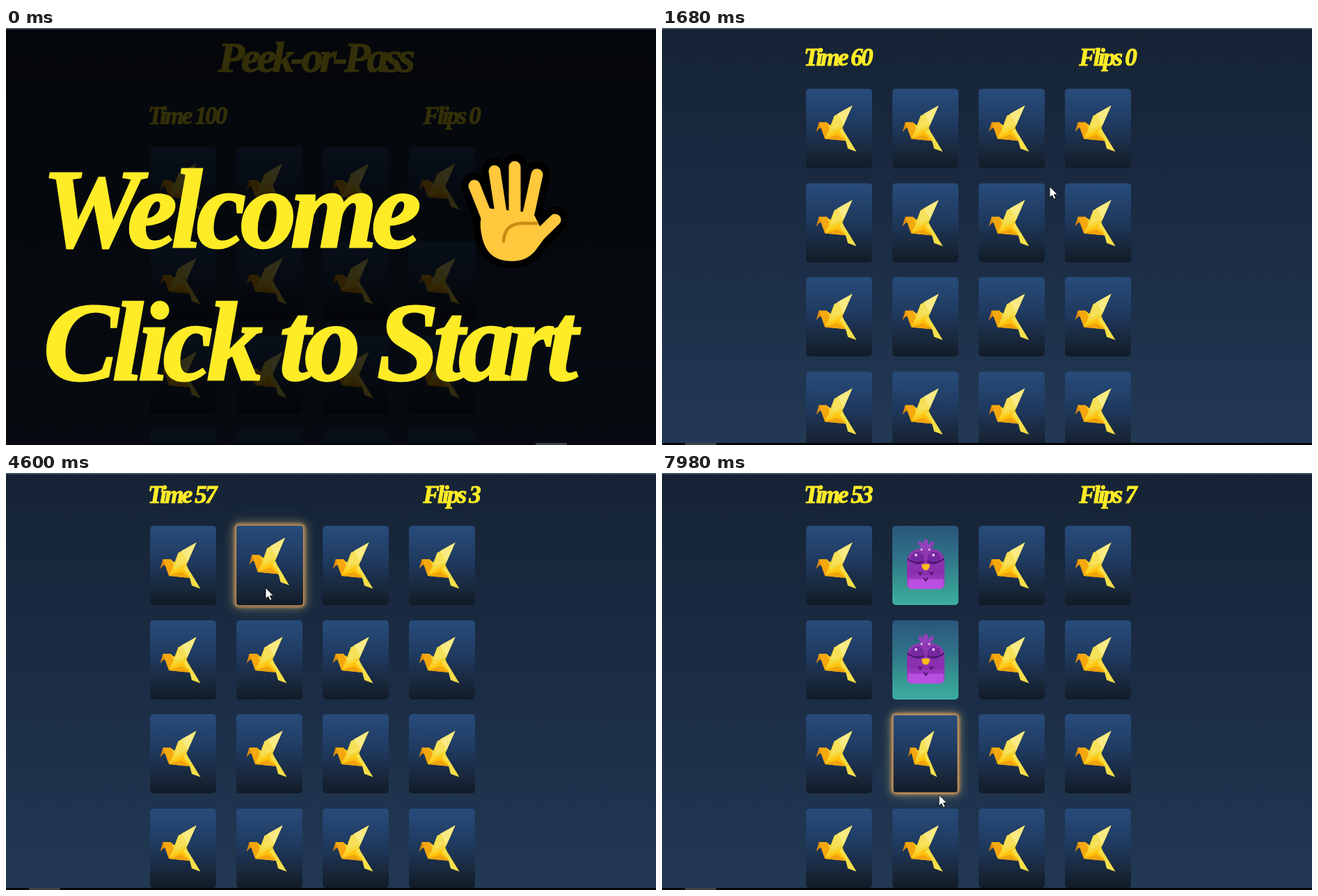
Animation of 934x600 px, one loop 8000 ms. Source, as an HTML page:

```html
<!DOCTYPE html>
<html lang="en">
<head>
<meta charset="utf-8">
<title>Card game</title>
<style>
html, body { margin: 0; width: 100%; height: 100%; overflow: hidden; }
body { position: relative; background: linear-gradient(#162335, #1b2c45 50%, #223954); }
#page, #shade, #page > svg, #top, #bottom, #thumb, #cursor { position: absolute; left: 0; top: 0; }
#page, #shade, #page > svg { width: 934px; height: 600px; }
#page > svg { overflow: visible; }
text { font: italic bold 35px "Liberation Serif", "Times New Roman", serif; letter-spacing: -.08em;
  fill: #ffec27; stroke: #ffec27; stroke-width: 1px; white-space: pre; }
text.title { font-size: 62px; stroke-width: 1.2px; }
text.big { font-size: 160px; letter-spacing: -.05em; stroke-width: 3px; }
.card { position: absolute; width: 95.5px; height: 114px; border-radius: 5px;
  background: linear-gradient(#284c7b, #1f3a60 45%, #19283c 78%, #111b27); }
.card svg, .glow, .face { position: absolute; left: 0; top: 0; width: 95.5px; height: 114px; }
.card svg { transform-origin: 43.5px 57px; }
.face { border-radius: 5px; overflow: hidden;
  background: linear-gradient(#2b557c, #2f7389 40%, #36958f 72%, #3cafa2); }
.glow { border-radius: 5px;
  box-shadow: inset 0 0 0 1.5px #cf955a, 0 0 4px 1px #d99a55, 0 0 13px 2px rgba(216,178,110,.5), 0 0 24px 4px rgba(60,110,110,.3); }
#top { width: 934px; height: 1.5px; background: #45545f; }
#bottom { top: 597px; width: 934px; height: 3px; background: #05070b; }
#thumb { top: 597px; width: 45px; height: 3px; background: #3e4246; }
#cursor { overflow: visible; width: 1px; height: 1px; }
</style>
</head>
<body>
<svg width="0" height="0" style="position:absolute">
  <defs>
    <linearGradient id="plum" x1="0" y1="0" x2="0" y2="1">
      <stop offset="0" stop-color="#8e3bb0"/><stop offset=".6" stop-color="#8a2fae"/><stop offset="1" stop-color="#b84be0"/>
    </linearGradient>
    <g id="bird">
      <path fill="#dd8a0b" d="M14.5 62 18.5 48 25 56 19 57Z"/>
      <path fill="#f5a70e" d="M18.5 48H30L36 59 27 72 22 58Z"/>
      <path fill="#ffc30d" d="M36 57H53L58 75 27 72Z"/>
      <path fill="#f0a30c" d="M27 72 45 66 58 75Z"/>
      <path fill="#ffcf22" d="M30 49 34 57 28 70 46 60Z"/>
      <path fill="#f4d83c" d="M33.5 57 40.5 39 66.5 24 52 57 34 63Z"/>
      <path fill="#faea83" d="M45 36 66.5 24 54 52Z"/>
      <path fill="#f7e15a" d="M40.5 39 45 37 54 52 36 58Z"/>
      <path fill="#f6df49" d="M52 57 72.5 90.5 60 86 56 71 47 61Z"/>
    </g>
    <g id="purple">
      <g fill="#9440bd">
        <ellipse cx="42" cy="28" rx="3" ry="7" transform="rotate(-35 42 28)"/>
        <ellipse cx="48" cy="26" rx="3.5" ry="7"/>
        <ellipse cx="55" cy="28" rx="3" ry="7" transform="rotate(35 55 28)"/>
      </g>
      <path fill="url(#plum)" d="M21 83V50Q23 32 48 32 73 32 75 50V83Q75 91 67 91H29Q21 91 21 83Z"/>
      <path fill="#b94fe0" d="M23 77H73V83Q73 91 66 91H30Q23 91 23 83Z"/>
      <circle cx="36" cy="47" r="9.5" fill="#7527a0"/><circle cx="60" cy="47" r="9.5" fill="#7527a0"/>
      <path fill="none" stroke="#42105f" stroke-width="1.8" d="M25 50Q36 56 46 51M50 51Q60 56 71 50M25 50 22 47M71 50 74 47"/>
      <path fill="none" stroke="#54156f" stroke-width="2" d="M37 66 40 70 43 66M53 66 56 70 59 66M45 75 48 79 51 75"/>
      <path fill="#ffbd18" d="M42 56Q48 53 54 56 53 64 48 64 43 64 42 56Z"/>
      <g fill="#e9c6f4"><circle cx="42" cy="34" r="1.6"/><circle cx="53" cy="34" r="1.6"/><circle cx="34" cy="42" r="2"/><circle cx="59" cy="42" r="2"/></g>
    </g>
    <g id="owl">
      <path fill="#8e3ab5" d="M19 70H77V80Q77 90 67 90H29Q19 90 19 80Z"/>
      <path fill="#c4402e" d="M19 73 24 79 31 73 38 81 48 75 58 81 65 73 72 79 77 73V62H19Z"/>
      <path fill="#f3e1d9" d="M19 73V45L23 33 27 37 32 25 37 31 42 22 46 29 51 21 56 29 62 24 65 35 72 32 77 45V73L72 76 65 70 58 77 48 71 38 77 31 70 24 76Z"/>
      <g fill="#f3d43a"><circle cx="36" cy="48" r="9"/><circle cx="60" cy="48" r="9"/></g>
      <g fill="#35b5cf"><circle cx="36" cy="48" r="6"/><circle cx="60" cy="48" r="6"/></g>
      <g fill="#17344d"><circle cx="36" cy="48" r="3.5"/><circle cx="60" cy="48" r="3.5"/></g>
      <g fill="#fff"><circle cx="34.500" cy="46" r="1.500"/><circle cx="58.500" cy="46" r="1.500"/></g>
      <path fill="#f59a1b" d="M48 50 55 56 48 64 41 56Z"/>
    </g>
    <g id="hand" stroke-linecap="round" stroke-linejoin="round">
      <path d="M693 268Q687 282 694 305 701 327 727 327 744 327 754 315L765 300 752 274Z"/>
      <path fill="none" d="M673 227 694 280M702 206 712 272M731 200V272M763 211 749 276M789 276 752 312"/>
    </g>
  </defs>
</svg>

<div id="page">
  <svg>
    <text class="title" x="444" y="63" text-anchor="middle">Peek-or-Pass</text>
    <text id="time" x="204" y="138"></text>
    <text id="flips" x="680" y="138" text-anchor="end"></text>
  </svg>
</div>
<svg id="shade">
  <rect id="dim" width="934" height="600"/>
  <g id="welcome">
    <text class="big" x="52" y="315">Welcome</text>
    <text class="big" x="54" y="506">Click to Start</text>
    <use href="#hand" fill="#000" stroke="#000" stroke-width="38"/>
    <use href="#hand" fill="#ffc83d" stroke="#ffc83d" stroke-width="17"/>
    <path d="M715 307Q716 282 741 281H763" fill="none" stroke="#c98a14" stroke-width="4.500" stroke-linecap="round"/>
  </g>
</svg>
<div id="top"></div><div id="bottom"></div><div id="thumb"></div>
<svg id="cursor">
  <path id="beam" d="M-4-7H-1.500L0-6 1.500-7H4M0-6V6M-4 7H-1.500L0 6 1.500 7H4" fill="none" stroke="#dfe3e6" stroke-width="1.200"/>
  <path id="arrow" d="M0 0V16L3.700 12.700 6.200 18.300 9 17 6.500 11.700H11.500Z" fill="#fff" stroke="#111" stroke-width="1"/>
</svg>

<script>
const LOOP = 8000, END = 1e5;
const $ = id => document.getElementById(id);
const ramp = (t, a, b) => Math.min(1, Math.max(0, (t - a) / (b - a)));
const smooth = p => p * p * (3 - 2 * p);

// card index: hover spans and face-up spans in ms
const HOVER = {
  1: [[2710, 2950], [3450, 4750], [6820, 7300]],
  2: [[2420, 2700]],
  3: [[4980, 5420]],
  5: [[2980, 3480], [5530, 6720]],
  9: [[7480, END]]
};
const OPEN = {
  1: [[4510, 6340], [7150, END]],
  2: [[2630, 4150]],
  3: [[5340, 6340]],
  5: [[3150, 4150], [6500, END]],
  9: [[7820, END]]
};
const CLICKS = Object.values(OPEN).flat().map(s => s[0]);
// time, x, y
const PATH = [
  [0, 399, 325], [950, 399, 325], [1600, 557, 228], [2000, 557, 228],
  [2450, 475, 155], [2600, 457, 140], [2640, 456, 140], [2760, 405, 150],
  [3050, 375, 265], [3300, 372, 268], [3560, 376, 165], [4600, 373, 165],
  [4780, 440, 195], [5040, 618, 165], [5340, 625, 150],
  [5620, 372, 276], [6130, 366, 282], [6600, 368, 278], [6950, 374, 160],
  [7200, 374, 165], [7560, 382, 400], [7820, 388, 425], [7980, 398, 463], [8000, 399, 465]
];

const cards = Array.from({ length: 16 }, (_, i) => {
  const el = document.createElement('div');
  el.className = 'card';
  el.style.left = 206.5 + (i % 4) * 124.15 + 'px';
  el.style.top = 171 + Math.floor(i / 4) * 135.65 + 'px';
  const face = i === 2 || i === 3 ? 'owl' : 'purple';
  el.innerHTML = `<svg><use href="#bird"/></svg>
    <div class="face"><svg><use href="#${face}"/></svg></div><div class="glow"></div>`;
  $('page').append(el);
  const [bird, front, glow] = el.children;
  return { el, bird, front, glow, hover: HOVER[i] || [], open: OPEN[i] || [] };
});

function drawCard(c, t) {
  let glow = 0, fly = 0, turn = 0, lower = 0;
  for (const [a, b] of c.hover) {
    const out = 1 - ramp(t, b, b + 200);
    glow = Math.max(glow, ramp(t, a, a + 200) * out);
    fly = Math.max(fly, smooth(ramp(t, a + 250, a + 550)) * out);
  }
  for (const [a, b] of c.open) {
    turn = Math.max(turn, smooth(ramp(t, a, a + 500)) - smooth(ramp(t, b, b + 500)));
    lower = Math.max(lower, ramp(t, a, a + 160) - ramp(t, b, b + 160));
  }
  const lift = 1 - lower, cos = Math.cos(turn * Math.PI);
  c.el.style.transform = `scale(${1 + .072 * glow * lift})`;
  c.el.style.zIndex = glow > 0 ? 1 : 0;
  c.glow.style.opacity = glow;
  c.bird.style.transform = `translate(${8.5 * fly * lift}px,${-13.5 * fly * lift}px) scaleX(${Math.max(0, cos)})`;
  c.front.style.transform = `scaleX(${Math.max(0, -cos)})`;
}

function drawCursor(t) {
  let i = 0;
  while (i < PATH.length - 2 && t >= PATH[i + 1][0]) i++;
  const [a, x, y] = PATH[i], [b, u, v] = PATH[i + 1];
  const p = smooth(ramp(t, a, b));
  $('cursor').style.transform = `translate(${x + (u - x) * p}px,${y + (v - y) * p}px)`;
  $('cursor').style.display = t < 70 ? 'none' : '';
  $('beam').style.display = t < 1000 ? '' : 'none';
  $('arrow').style.display = t < 1000 ? 'none' : '';
}

function draw(t) {
  const size = 1 - ramp(t, 450, 1300);
  $('dim').setAttribute('opacity', .8 * size);
  $('welcome').setAttribute('transform', `translate(445 344) scale(${size}) translate(-445 -344)`);
  $('shade').style.display = size > 0 ? '' : 'none';

  const left = 1 - ramp(t, 1400, 1830);
  $('page').style.transform = `translateY(${-95 * (1 - left * left)}px)`;

  const secs = t < 450 ? 100 : 60 - Math.max(0, Math.floor((t - 810) / 1000));
  $('time').textContent = 'Time ' + secs;
  $('flips').textContent = 'Flips ' + CLICKS.filter(c => c <= t).length;
  $('thumb').style.left = (t < 70 ? 761 : 33) + 'px';

  for (const c of cards) drawCard(c, t);
  drawCursor(t);
}

const start = performance.now();
function tick() {
  draw((performance.now() - start) % LOOP);
  requestAnimationFrame(tick);
}
tick();
</script>
</body>
</html>
```
